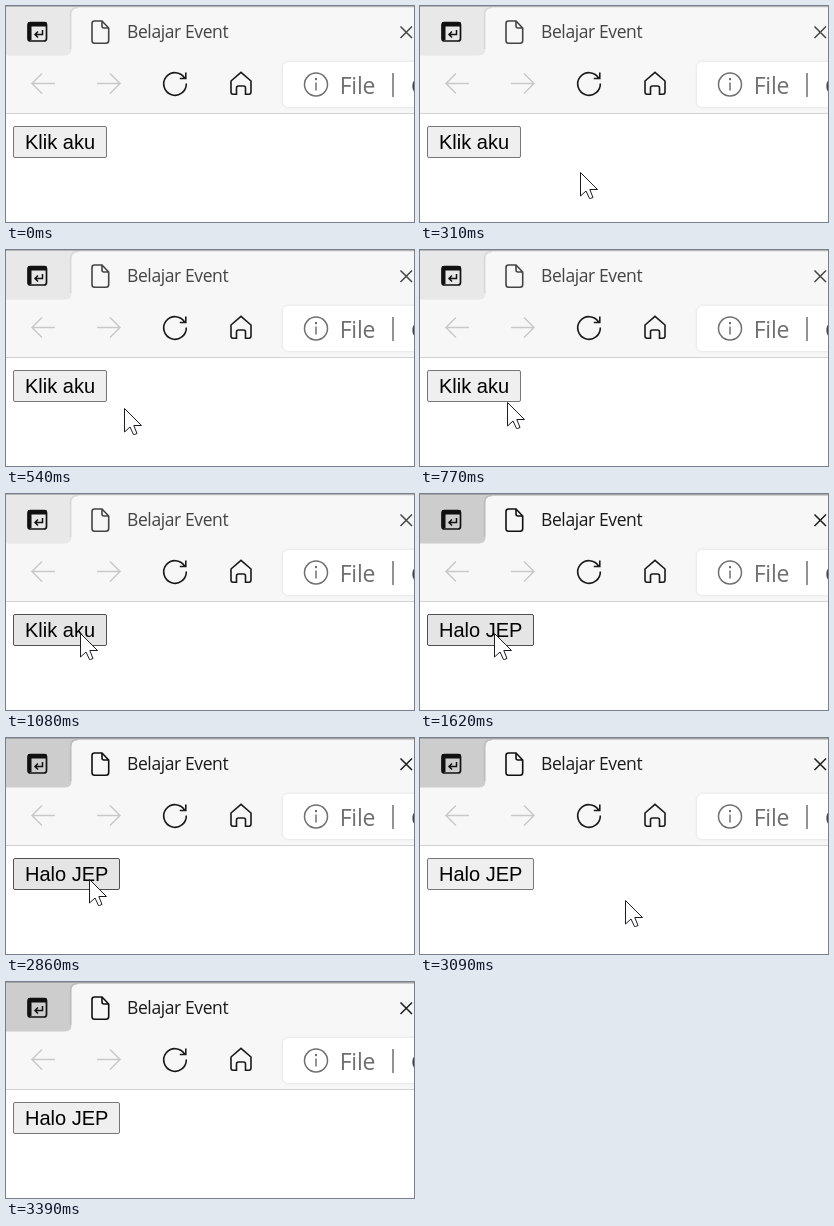
Recreate the animation shown at these times as an HTML page with a canvas. Size 408x216 px, loop 3940 ms.

```html
<!DOCTYPE html>
<html lang="id">
<head>
<meta charset="utf-8">
<title>Belajar Event</title>
<style>
html, body { margin: 0; width: 408px; height: 216px; overflow: hidden; background: #fff; }
canvas { display: block; }
</style>
</head>
<body>
<canvas id="stage" width="408" height="216"></canvas>
<script>
const ctx = document.getElementById('stage').getContext('2d');
const LOOP = 3940;
const UI = '"Open Sans", "Noto Sans", sans-serif';
const TICKS = [0, 80, 150, 230, 310, 380, 460];

const mix = (a, b, p) => a + (b - a) * p;
const smooth = p => p * p * (3 - 2 * p);

function tick(t, start) {
  let k = 0;
  while (k < 6 && t >= start + TICKS[k + 1]) k++;
  return k;
}

function pointer(t) {
  if (t < 80 || t >= 3390) return null;
  if (t < 620) {
    const r = Math.pow(1 - tick(t, 80) / 6, 2.39);
    return [118 + 220 * r, 158 + 42 * r];
  }
  if (t < 2860) {
    const p = (tick(t, 620) + 1) / 7;
    return [mix(74, 118, Math.pow(1 - p, 2.14)), mix(158, 139, smooth(Math.pow(p, 1.15)))];
  }
  const p = tick(t, 2860) / 6;
  const u = (p + smooth(p)) / 2;
  return [mix(83, 326, u), mix(141, 213, Math.pow(u, 1.8))];
}

function line(d, color, width, fill) {
  const path = new Path2D(d);
  if (fill) {
    ctx.fillStyle = fill;
    ctx.fill(path);
  }
  ctx.strokeStyle = color;
  ctx.lineWidth = width;
  ctx.stroke(path);
}

function box(x, y, w, h, r, fill, stroke) {
  ctx.beginPath();
  ctx.roundRect(x, y, w, h, r);
  ctx.fillStyle = fill;
  ctx.fill();
  if (stroke) {
    ctx.strokeStyle = stroke;
    ctx.lineWidth = 1;
    ctx.stroke();
  }
}

function text(s, x, y, font, color, spacing = 0) {
  ctx.font = font;
  ctx.letterSpacing = spacing + 'px';
  ctx.fillStyle = color;
  ctx.fillText(s, x, y);
}

function drawTabs(active) {
  const ink = active ? '#101010' : '#444';
  ctx.fillStyle = '#f7f7f7';
  ctx.fillRect(0, 0, 408, 107);
  ctx.fillStyle = active ? '#cdcdcd' : '#e8e8e8';
  ctx.fill(new Path2D('M0 0H408V2H72Q65.5 2 65.5 8V43Q65.5 49.5 59 49.5H0Z'));
  line('M64.5 43V8Q65 1.5 72 1.5', active ? '#bdbdbd' : '#d8d8d8', 1.5);
  ctx.fillStyle = active ? '#a6a6a6' : '#b4b4b4';
  ctx.fillRect(0, 0, 408, 1);

  line('M24.5 16.5H38Q40.5 16.5 40.5 19V32.5Q40.5 35 38 35H24.5Q22 35 22 32.5V19Q22 16.5 24.5 16.5Z', '#111', 1.7);
  ctx.fillStyle = '#111';
  ctx.fillRect(22, 16, 18.5, 4.5);
  ctx.fillRect(22, 17, 3.5, 17);
  line('M36.5 24V28.5H29M32 25.5L29 28.5L32 31.5', '#111', 1.5);

  line('M88.5 15H96L102.7 22V34.5Q102.7 37.2 100 37.2H88.5Q86 37.2 86 34.5V17.5Q86 15 88.5 15ZM96 15V20Q96 22 98 22H102.7', ink, 1.6);
  text('Belajar Event', 121, 32, '17.5px ' + UI, active ? '#1a1a1a' : '#444', -0.4);
  line('M394.5 20.5L406 32M406 20.5L394.5 32', active ? '#1a1a1a' : '#444', 1.5);
}

function drawToolbar() {
  line('M49 77.5H26M36 67.5L26 77.5L36 87.5', '#c9c9c9', 1.5);
  line('M91 77.5H114M104 67.5L114 77.5L104 87.5', '#c9c9c9', 1.5);
  line('M180.3 77.5A11.3 11.3 0 1 1 178.6 72M179.8 66.5V72.5H173.8', '#1a1a1a', 1.6);
  line('M225 75L235 66.4L245 75V86Q245 88.2 243 88.2H239.5V82Q239.5 80 237.5 80H232.5Q230.5 80 230.5 82V88.2H227Q225 88.2 225 86Z', '#1a1a1a', 1.6);

  ctx.save();
  ctx.shadowColor = 'rgba(0,0,0,.13)';
  ctx.shadowBlur = 3;
  box(277, 56, 150, 45, 5, '#fff');
  ctx.restore();
  line('M321.5 78.5A11.5 11.5 0 1 1 298.5 78.5A11.5 11.5 0 1 1 321.5 78.5ZM310 76.5V84.5', '#707070', 1.5);
  ctx.fillStyle = '#707070';
  ctx.fillRect(309, 72, 2, 2.2);
  text('File', 333.8, 88, '23px ' + UI, '#707070', -0.3);
  line('M387 67V91', '#777', 1.6);
  text('C', 405, 88, '22.5px ' + UI, '#444');

  ctx.fillStyle = '#d2d2d2';
  ctx.fillRect(0, 107, 408, 1);
}

function drawButton(label, width, hover) {
  box(7.5, 120.5, width - 1, 31, 1.5, hover ? '#e5e5e5' : '#efefef', hover ? '#4f4f4f' : '#767676');
  text(label, 19, 143, '20px "Liberation Sans", Arial, sans-serif', '#000');
}

function drawPointer([x, y]) {
  ctx.save();
  ctx.translate(Math.round(x) + 0.5, Math.round(y) + 0.5);
  line('M0 0V23.5L5.5 18.5L9 26H10L12.5 25L9.3 17H17Z', '#1c1c28', 1, '#fff');
  ctx.restore();
}

function draw(t) {
  const clicked = t >= 1620;
  const width = clicked ? 107 : 94;
  const pos = pointer(t);
  const hover = !!pos && pos[0] < 7 + width && pos[1] < 151.5;

  ctx.fillStyle = '#fff';
  ctx.fillRect(0, 0, 408, 216);
  drawTabs(t >= 1540);
  drawToolbar();
  drawButton(clicked ? 'Halo JEP' : 'Klik aku', width, hover);
  if (pos) drawPointer(pos);
}

const start = performance.now();
function frame() {
  draw((performance.now() - start) % LOOP);
  requestAnimationFrame(frame);
}
frame();
</script>
</body>
</html>
```
